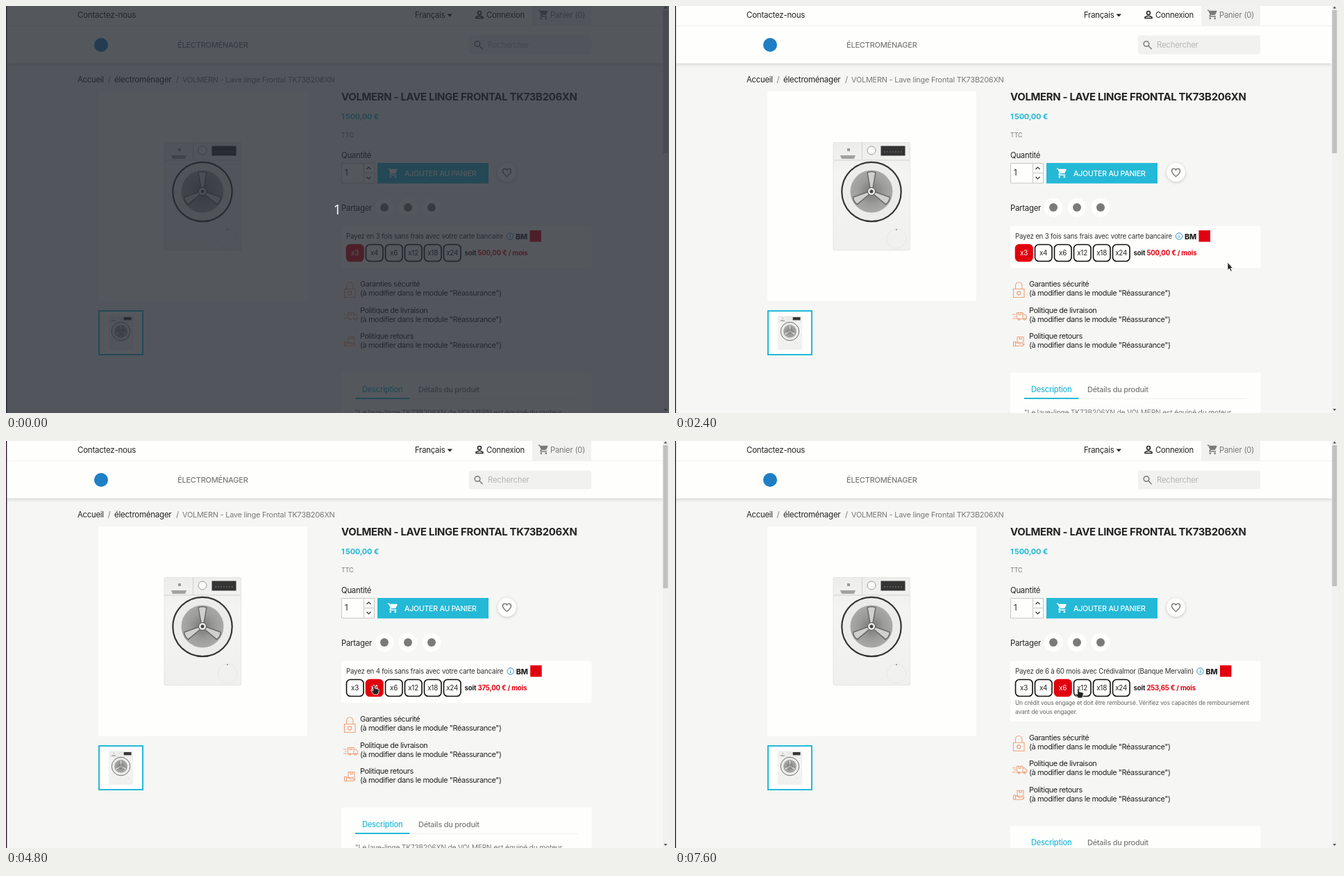
An HTML page that plays this animation: 955 by 586 pixels, repeating every 8000 ms.

```html
<!DOCTYPE html>
<html lang="fr">
<head>
<meta charset="utf-8">
<title>Fiche produit</title>
<style>
  html, body { margin: 0; width: 100%; height: 100%; overflow: hidden; }
  svg { display: block; width: 955px; height: 586px; background: #f6f6f5; }
  text { font: 11.3px Inter, sans-serif; letter-spacing: -.02em; fill: #232323; }
  .grey { fill: #7a7a7a; }
  .cyan { fill: #24b9d7; }
  .white { fill: #fefefd; }
  .red { fill: #e1000f; }
  .medium { font-weight: 500; }
  .bold { font-weight: 700; }
  .pay { font-size: 9.7px; fill: #333; }
  .legal { font-size: 8.45px; fill: #666; }
  .reassure text { font-size: 10.95px; letter-spacing: -.04em; }
  .line { fill: none; stroke: #7a7a7a; stroke-width: 1.5; }
  .orange { fill: none; stroke: #f0a27a; stroke-width: 1.1; }
  .shadow { filter: drop-shadow(0 1px 2px rgba(0, 0, 0, .2)); }
  #months text { font-size: 9.8px; text-anchor: middle; }
</style>
</head>
<body>
<svg viewBox="0 0 955 586">
  <defs>
    <linearGradient id="body" x2="0" y2="1">
      <stop stop-color="#ededec"/><stop offset=".3" stop-color="#f4f4f3"/><stop offset="1" stop-color="#f0f0ef"/>
    </linearGradient>
    <radialGradient id="glass">
      <stop stop-color="#777"/><stop offset=".6" stop-color="#9c9c9b"/><stop offset="1" stop-color="#a9a9a8"/>
    </radialGradient>
    <g id="cart">
      <path d="M1 2v2h2l3.6 7.6-1.9 3.4q-.3 2 2.3 2h12v-2H7.4l1.1-2h7.5q1.2 0 1.7-1L21 5.5Q21.5 4 20 4H5.2l-.9-2z"/>
      <circle cx="7" cy="20" r="2"/><circle cx="17" cy="20" r="2"/>
    </g>
    <g id="washer">
      <rect x="228" y="196.500" width="110.500" height="155" rx="1.500" fill="url(#body)" stroke="#dededd" stroke-width=".7"/>
      <path d="M228 222h110M269.500 197v24" stroke="#d2d2d1" fill="none"/>
      <rect x="248" y="205" width="4" height="4" fill="#999"/>
      <path d="M238 215h22l-2 5h-18z" fill="#a2a2a1"/>
      <circle cx="283" cy="208" r="6" fill="#fafafa" stroke="#9a9a9a"/>
      <rect x="296.500" y="201.500" width="35" height="14" fill="#343434"/>
      <path d="M301 210h26" stroke="#777" stroke-dasharray="2 2"/>
      <circle cx="283" cy="267.500" r="42.700" fill="#ececeb" stroke="#343434" stroke-width="2.200"/>
      <circle cx="283" cy="267" r="30.500" fill="url(#glass)"/>
      <g fill="#d0d0cf" stroke="#6a6a69" stroke-width="1.500">
        <path id="paddle" d="M281 262l-4-22q6-3 12 0l-4 22z"/>
        <use href="#paddle" transform="rotate(120 283 267)"/>
        <use href="#paddle" transform="rotate(240 283 267)"/>
      </g>
      <circle cx="283" cy="267" r="5.500" fill="#eee" stroke="#555"/>
      <circle cx="283" cy="267" r="2.500" fill="#444"/>
      <circle cx="319" cy="335" r="14" fill="none" stroke="#e8e8e7"/>
      <circle cx="319" cy="322" r="1" fill="#888"/>
    </g>
  </defs>

  <!-- header -->
  <g class="white">
    <rect width="946" height="82.500" style="filter: drop-shadow(0 2px 2.500px rgba(0,0,0,.13))"/>
  </g>
  <path d="M0 28.500h946" stroke="#f0f0ef"/>
  <text x="103" y="17" style="font-size:11.5px">Contactez-nous</text>
  <text x="589" y="17">Français</text>
  <path d="M635.500 11.500h7.500l-3.750 4z" fill="#232323"/>
  <g class="line" style="stroke:#232323">
    <circle cx="682" cy="10" r="2.500"/>
    <path d="M677 17.500v-1.500q5-3.500 10 0v1.500z"/>
  </g>
  <text x="692" y="17">Connexion</text>
  <rect x="758" width="85" height="28" fill="#f1f1f0"/>
  <use href="#cart" class="grey" transform="translate(766 4) scale(.69)"/>
  <text x="784" y="17" class="grey">Panier (0)</text>
  <circle cx="137" cy="56" r="10" fill="#1f7fc4"/>
  <text x="247" y="60" class="grey medium" style="font-size:11px">ÉLECTROMÉNAGER</text>
  <rect x="667" y="42.500" width="176" height="27" rx="2.500" fill="#f1f1f0"/>
  <g class="line" stroke-linecap="round">
    <circle cx="679" cy="54.500" r="3.800"/><path d="M682 57.500l4.200 4.200"/>
  </g>
  <text x="694" y="60" style="fill:#b6b6b4;font-size:11.4px">Rechercher</text>

  <!-- breadcrumb and picture -->
  <text x="103" y="110">Accueil</text>
  <text x="146.500" y="110" class="grey">/</text>
  <text x="156" y="110" style="font-size:11.5px">électroménager</text>
  <text x="245" y="110" class="grey">/</text>
  <text x="254" y="110" class="grey" style="font-size:10.9px">VOLMERN - Lave linge Frontal TK73B206XN</text>
  <rect x="133" y="123" width="301" height="302" rx="2" class="white"/>
  <use href="#washer"/>
  <rect x="134" y="439" width="63" height="63" class="white" stroke="#24b9d7" stroke-width="2"/>
  <use href="#washer" transform="translate(165.500 470.500) scale(.31) translate(-283 -274)"/>

  <!-- product -->
  <text x="483" y="136" class="bold" style="font-size:14.9px">VOLMERN - LAVE LINGE FRONTAL TK73B206XN</text>
  <text x="483" y="163" class="bold cyan" style="font-size:11px">1&#8239;500,00 €</text>
  <text x="483" y="189" class="grey" style="font-size:9px">TTC</text>
  <text x="483" y="219">Quantité</text>
  <path class="white" stroke="#c6c6c4" d="M483.500 226.500h47v28.500h-47zM515.500 226.500v28.500M515.500 240.500h15"/>
  <text x="488" y="244">1</text>
  <path class="line" style="stroke:#333;stroke-width:1.2" d="M519.500 235l3-3 3 3M519.500 246l3 3 3-3"/>
  <rect x="535" y="226" width="160" height="29.500" class="cyan"/>
  <use href="#cart" class="white" transform="translate(549 232) scale(.7)"/>
  <text x="574" y="245" class="white medium" style="font-size:10.5px">AJOUTER AU PANIER</text>
  <circle cx="721.500" cy="239.500" r="13.500" class="white shadow"/>
  <path class="line" d="M721.500 245.500c-3-2.600-6-4.800-6-8 0-3.700 4.300-4.300 6-1.500 1.700-2.800 6-2.200 6 1.500 0 3.200-3 5.400-6 8z"/>
  <text x="483" y="295">Partager</text>
  <g class="white">
    <circle cx="545" cy="290" r="13.500"/><circle cx="579" cy="290" r="13.500"/><circle cx="613" cy="290" r="13.500"/>
  </g>
  <g class="grey">
    <circle id="share" cx="545" cy="290" r="6"/><circle cx="579" cy="290" r="6"/><circle cx="613" cy="290" r="6"/>
  </g>

  <!-- instalments -->
  <rect id="card" x="483" y="317" width="360.500" height="60" rx="2" class="white"/>
  <text id="offer" x="490" y="335" class="pay"></text>
  <g id="bank">
    <circle cx="726" cy="331.500" r="4.700" fill="none" stroke="#2f8fc6"/>
    <path d="M726 330.500v3.500M726 328.500v1" stroke="#2f8fc6"/>
    <text x="734" y="335.500" style="font-size:10.8px;font-weight:800">BM</text>
    <rect x="754.500" y="323" width="16.500" height="16.500" class="red"/>
  </g>
  <g id="months"></g>
  <text x="660.500" y="359" class="bold" style="font-size:9.7px">soit <tspan id="price" class="red"></tspan></text>
  <g id="legal">
    <text x="490" y="380" class="legal">Un crédit vous engage et doit être remboursé. Vérifiez vos capacités de remboursement</text>
    <text x="490" y="393" class="legal">avant de vous engager.</text>
  </g>

  <g id="below">
    <g class="reassure">
      <text x="510" y="404">Garanties sécurité</text>
      <text x="510" y="417">(à modifier dans le module "Réassurance")</text>
      <text x="510" y="441.500">Politique de livraison</text>
      <text x="510" y="454.500">(à modifier dans le module "Réassurance")</text>
      <text x="510" y="479">Politique retours</text>
      <text x="510" y="492">(à modifier dans le module "Réassurance")</text>
    </g>
    <g class="orange">
      <path d="M487.500 407.500h15.500v12h-15.500zM490.500 407v-4.500a4.700 4.700 0 0 1 9.400 0v4.500"/>
      <circle cx="495.200" cy="413.500" r="2.600"/>
      <path d="M492.500 441.500h8.500v9h-8.500zM501 444h3l2.500 3v3.500h-5.500M495 441.500v3h3v-3M486 444h5M488 447h3M486 450h5"/>
      <circle cx="495.500" cy="451" r="1.300"/><circle cx="503.500" cy="451" r="1.300"/>
      <path d="M493 476.500h9v8h-9zM496 476.500v3h3v-3M487.500 483.500h3v6h-3zM490.500 485q3-1 5 1.500h7.500q-1 3-4 3h-8.500"/>
    </g>
    <rect x="483" y="527.500" width="360.500" height="90" rx="2" class="white"/>
    <text x="513" y="555.500" class="cyan medium" style="font-size:11.1px">Description</text>
    <text x="594" y="555.500" class="grey medium" style="font-size:10.9px">Détails du produit</text>
    <path d="M503 565.500h321" stroke="#f0f0ef"/>
    <rect x="503" y="564" width="78.500" height="2" class="cyan"/>
    <text x="503" y="589" class="grey" style="font-size:10.25px">"Le lave-linge TK73B206XN de VOLMERN est équipé du moteur</text>
  </g>

  <!-- window edges -->
  <rect x="946" width="9" height="586" fill="#f1f1f0"/>
  <rect id="thumb" x="946.500" y="6" width="7" height="206" fill="#c1c1c0"/>
  <path d="M947.500 3.500l2.500-3 2.500 3zM947.500 580l2.500 3 2.500-3z" fill="#555"/>
  <rect width="1.300" height="586" fill="#2e0c24"/>

  <g id="cursor" stroke="#fff" stroke-width=".8" stroke-linejoin="round" fill="#222">
    <path id="arrow" d="M0 0v11.500l2.600-2.400 1.900 4.200 1.900-.9-1.900-4h3z"/>
    <path id="hand" d="M-1.300 1Q0-.8 1.300 1v4l4.500 1q1.700.4 1.500 2.500l-.8 2.500-1 3h-6l-3.300-5q-.8-1.600.7-1.400l1.800 1.400z"/>
  </g>

  <g id="countdown">
    <rect width="955" height="586" fill="rgb(36,41,49)" opacity=".78"/>
    <text x="477" y="300" text-anchor="middle" style="font:20px 'Open Sans',sans-serif;fill:#fff">1</text>
  </g>
</svg>
<script>
const LOOP = 8000, STEP = 200;
const $ = id => document.getElementById(id);
const show = (id, on) => $(id).style.display = on ? '' : 'none';
const shift = (id, x, y) => $(id).setAttribute('transform', `translate(${x} ${y})`);

const months = [3, 4, 6, 12, 18, 24];
const plans = [
  { from: 0, offer: 'Payez en 3 fois sans frais avec votre carte bancaire', price: '500,00', bankX: 0 },
  { from: 4600, offer: 'Payez en 4 fois sans frais avec votre carte bancaire', price: '375,00', bankX: 0.7 },
  { from: 6400, offer: 'Payez de 6 à 60 mois avec Crédivalmor (Banque Mervalin)', price: '253,65', bankX: 30.5, legal: true },
];

// Pointer path: time, x, y
const path = [
  [600, 690, 10], [1200, 540, 283], [1400, 530, 310], [1600, 510, 330], [1800, 600, 350],
  [2200, 770, 362], [2400, 796, 369], [2600, 720, 384], [2800, 610, 388], [3000, 520, 385],
  [3200, 481, 372], [3400, 488, 352], [3600, 507, 349], [3800, 518, 349], [4200, 530, 351],
  [5800, 530, 351], [6000, 548, 356], [6200, 557, 356], [6600, 565, 356], [7400, 565, 356],
  [7600, 581, 356], [LOOP, 581, 356],
];

$('months').innerHTML = months.map((n, i) => `
  <rect x="${490.5 + 28 * i}" y="343.500" width="24.500" height="24" rx="5.500" stroke-width="1.600"/>
  <text x="${502.6 + 28 * i}" y="359">x${n}</text>`).join('');
const boxes = [...$('months').querySelectorAll('rect')];
const labels = [...$('months').querySelectorAll('text')];

function pointerAt(t) {
  const i = Math.max(1, path.findIndex(k => k[0] > t));
  const [t0, x0, y0] = path[i - 1], [t1, x1, y1] = path[i];
  const p = (t - t0) / (t1 - t0);
  return [x0 + (x1 - x0) * p, y0 + (y1 - y0) * p];
}

function drawPlan(t) {
  const selected = plans.findLastIndex(p => t >= p.from);
  const { offer, price, bankX, legal } = plans[selected];
  $('offer').textContent = offer;
  $('price').textContent = `${price} € / mois`;
  shift('bank', bankX, 0);
  boxes.forEach((box, i) => {
    const on = i === selected;
    box.setAttribute('fill', on ? '#e1000f' : '#fefefd');
    box.setAttribute('stroke', on ? '#e1000f' : '#111');
    labels[i].style.fill = on ? '#fff' : '#232323';
  });
  show('legal', legal);
  $('card').setAttribute('height', legal ? 87 : 60);
  $('thumb').setAttribute('height', legal ? 203 : 206);
  shift('below', 0, legal ? 26.7 : 0);
}

function drawPointer(t) {
  const visible = t >= path[0][0];
  const [x, y] = pointerAt(t);
  const onShare = visible && Math.hypot(x - 545, y - 290) < 13.5;
  const onMonth = x >= 490 && x < 656 && y > 343 && y < 368 && (x - 490) % 28 < 25.5;
  show('cursor', visible);
  show('hand', onShare || onMonth);
  show('arrow', !(onShare || onMonth));
  shift('cursor', x, y);
  $('share').style.fill = onShare ? '#24b9d7' : '';
}

function frame() {
  const t = Math.floor(performance.now() % LOOP / STEP) * STEP;
  show('countdown', t < STEP);
  drawPlan(t);
  drawPointer(t);
  requestAnimationFrame(frame);
}
frame();
</script>
</body>
</html>
```
